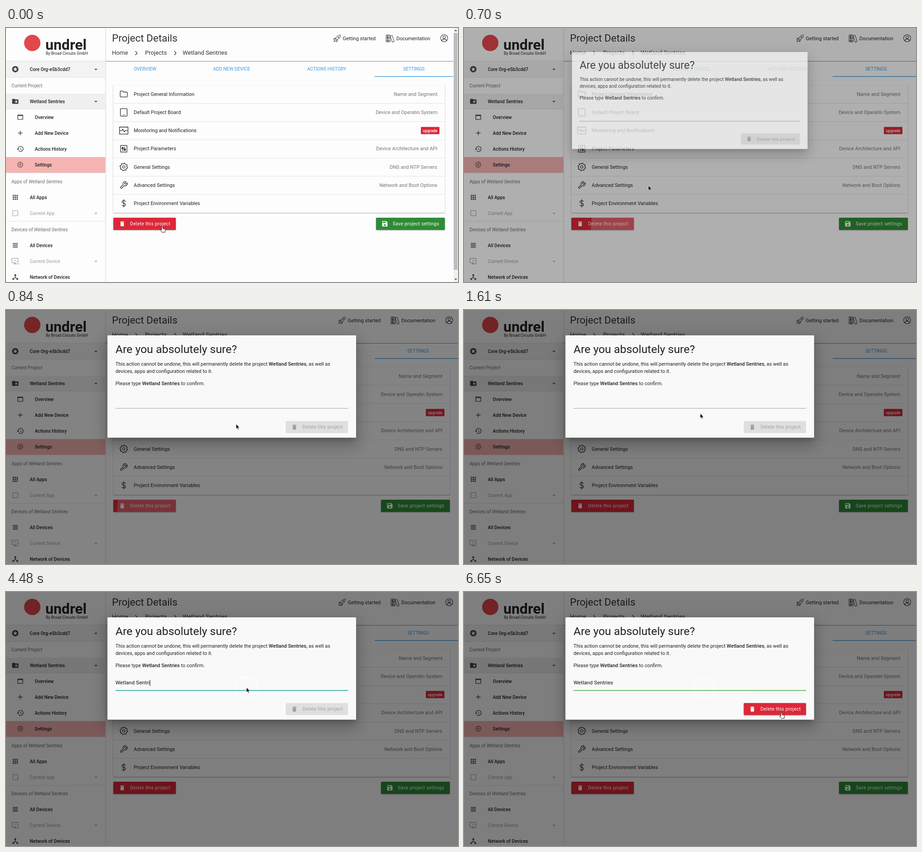
Write an HTML page that moves like this. It is 998 px wide and 561 px high and loops after 6.72 s.

```html
<!DOCTYPE html>
<html lang="en">
<head>
<meta charset="utf-8">
<title>Project settings</title>
<style>
html, body { margin: 0; width: 100%; height: 100%; overflow: hidden; background: #fdfdfd; }
body { --s: 0; position: relative; font-family: Roboto, Arial, sans-serif; }
svg, #shade, #dialog { position: absolute; left: 0; top: 0; }
svg { display: block; overflow: visible; }
text { font-size: 10.96px; fill: #212121; white-space: pre; }
.nav { font-size: 10.23px; font-weight: 500; }
.sub { font-size: 10.23px; fill: #6b6b6b; }
.sub tspan { font-style: italic; }
.crumb { font-size: 13.15px; fill: #333; }
.tab { font-size: 10.23px; fill: #3d9be0; text-anchor: middle; }
.note { fill: #757575; text-anchor: end; }
.btn { font-size: 10.23px; letter-spacing: .365px; fill: #fff; }
.b { font-weight: 500; }
.line { fill: none; stroke: #2b2b2b; stroke-linecap: round; stroke-linejoin: round; }
.r { transform: translateX(calc(var(--s) * 1px)); }
.wide { width: calc(732px + var(--s) * 1px); }
.raised { filter: drop-shadow(0 1px 1px rgba(0,0,0,.35)); }
#mark { width: calc(173px + var(--s) * 1px); }
#shade { width: 998px; height: 561px; background: #000; }
#dialog { left: 224.3px; top: 56px; width: 548.7px; height: 226px; border-radius: 1.5px; background: #f9f9f9;
  box-shadow: 0 17px 28px 2px rgba(0,0,0,.14), 0 7px 34px 6px rgba(0,0,0,.12), 0 8px 11px -5px rgba(0,0,0,.2); }
</style>
</head>
<body>
<svg id="page" width="998" height="561" viewBox="0 0 998 561"></svg>
<div id="shade"></div>
<div id="dialog"><svg id="form" width="548.7" height="226" viewBox="224.3 56 548.7 226"></svg></div>
<svg id="pointer" width="998" height="561" viewBox="0 0 998 561">
  <g id="arrow"><path d="M0 0V10.6L2.5 8.4 4.2 12.3 6 11.5 4.3 7.7H7.8Z" fill="#111" stroke="#fff" stroke-width=".7"/></g>
  <g id="hand"><path d="M-1.3 .8Q0 -.8 1.3 .8V5L6 6.2Q7 6.6 6.8 8L6 13.2H-.6L-4.2 8.6Q-4.4 7-2.8 7.2L-1.3 8.4Z" fill="#fff" stroke="#222" stroke-width="1"/></g>
  <g id="beam"><path d="M-2.5 -6H-.8L0 -5.3 .8 -6H2.5M0 -5.3V5.3M-2.5 6H-.8L0 5.3 .8 6H2.5" fill="none" stroke="#333" stroke-width="1"/></g>
</svg>

<script>
const LOOP = 6720, STEP = 70;
const PROJECT = 'Wetland Sentries';
const $ = id => document.getElementById(id);
const clamp = v => Math.max(0, Math.min(1, v));
const span = (t, a, b) => clamp((t - a) / (b - a));
const easeOut = p => 1 - (1 - p) ** 2;
const easeBoth = p => p * p * (3 - 2 * p);

// Icons on a 24-unit grid
const glyph = {
  star: 'M12 2C6.47 2 2 6.48 2 12s4.47 10 10 10 10-4.48 10-10S17.52 2 12 2zm4.23 16L12 15.45 7.77 18l1.12-4.81-3.73-3.23 4.92-.42L12 5l1.92 4.53 4.92.42-3.73 3.23z',
  project: 'M20 6h-8l-2-2H4c-1.1 0-2 .9-2 2v12c0 1.1.9 2 2 2h16c1.1 0 2-.9 2-2V8c0-1.1-.9-2-2-2zm-2.06 11L15 15.28 12.06 17l.78-3.33-2.59-2.24 3.41-.29L15 8l1.34 3.14 3.41.29-2.59 2.24z',
  window: 'M19 4H5c-1.1 0-2 .9-2 2v12c0 1.1.9 2 2 2h14c1.1 0 2-.9 2-2V6c0-1.1-.9-2-2-2zm0 14H5V8h14z',
  plus: 'M19 13h-6v6h-2v-6H5v-2h6V5h2v6h6z',
  history: 'M13 3c-4.97 0-9 4.03-9 9H1l3.9 4L9 12H6c0-3.87 3.13-7 7-7s7 3.13 7 7-3.13 7-7 7c-1.93 0-3.68-.79-4.94-2.06l-1.42 1.42C8.27 20 10.5 21 13 21c4.97 0 9-4.03 9-9s-4.03-9-9-9zm-1 5v5l4.28 2.54.72-1.21-3.5-2.08V8z',
  apps: [4, 10, 16].map(x => [4, 10, 16].map(y => `M${x} ${y}h4v4h-4z`).join('')).join(''),
  box: 'M19 5v14H5V5h14m0-2H5c-1.1 0-2 .9-2 2v14c0 1.1.9 2 2 2h14c1.1 0 2-.9 2-2V5c0-1.1-.9-2-2-2z',
  rows: [5, 9, 13, 17].map(y => `M4 ${y}h16v2H4z`).join(''),
  devices: 'M22 10h-4c-.6 0-1 .4-1 1v10c0 .6.4 1 1 1h4c.6 0 1-.4 1-1V11c0-.6-.4-1-1-1zm0 10h-4v-8h4zM20 2H2C1 2 0 3 0 4v12c0 1 1 2 2 2h7v2H7v2h8v-2h-2v-2h2v-2H2V4h18v4h2V4c0-1-1-2-2-2zM8 10l2-1 1-2 1 2 2 1-2 1-1 2-1-2z',
  hub: 'M17 16l-4-4V8.82C14.16 8.4 15 7.3 15 6c0-1.66-1.34-3-3-3S9 4.34 9 6c0 1.3.84 2.4 2 2.82V12l-4 4H3v5h5v-3.05l4-4.2 4 4.2V21h5v-5z',
  trash: 'M6 19c0 1.1.9 2 2 2h8c1.1 0 2-.9 2-2V7H6zM19 4h-3.5l-1-1h-5l-1 1H5v2h14z',
  save: 'M17 3H5c-1.1 0-2 .9-2 2v14c0 1.1.9 2 2 2h14c1.1 0 2-.9 2-2V7zm-5 16c-1.66 0-3-1.34-3-3s1.34-3 3-3 3 1.34 3 3-1.34 3-3 3zm3-10H5V5h10z',
  drop: 'M7 10l5 5 5-5z',
  folder: 'M22 18a2 2 0 0 1-2 2H4a2 2 0 0 1-2-2V5a2 2 0 0 1 2-2h5l2 3h9a2 2 0 0 1 2 2z',
  tablet: 'M4 1.5h16a1.5 1.5 0 0 1 1.5 1.5v18a1.5 1.5 0 0 1-1.5 1.5H4a1.5 1.5 0 0 1-1.5-1.5V3A1.5 1.5 0 0 1 4 1.5zM11 19h2',
  pulse: 'M0 2h24v20H0zM2 12h5l2.5-4 4 8 2.5-4h6',
  sliders: 'M3 2.5h18v19H3zM9 6v12M15 6v12M7 9h4v3H7zM13 13h4v3h-4z',
  wrench: 'M14.7 6.3a1 1 0 0 0 0 1.4l1.6 1.6a1 1 0 0 0 1.4 0l3.8-3.8a6 6 0 0 1-8 8l-6.9 6.9a2.1 2.1 0 0 1-3-3l6.9-6.9a6 6 0 0 1 8-8z',
  dollar: 'M12 1v22M17 6.5Q16 4.5 12 4.5C5.5 4.5 5.5 11 12 12S18.5 19.5 12 19.5Q8 19.5 7 17',
  rocket: 'M8 13C10 7 15 2 22 2c0 7-5 12-11 14zM9 11H4L2 15l5-1M13 15v5l-4 2 1-5M6 16l-4 6 5-3M14.5 9.5a1.8 1.8 0 1 1 3-2 1.8 1.8 0 1 1-3 2',
  books: 'M1 2h5v20H1zM6 2h6v20H6zM1 18h11M13 5l5-2 6 18-5 2zM9 6v7M3.5 6v7',
  user: 'M12 1.5a10.5 10.5 0 1 0 .01 0M12 5.5a3.8 3.8 0 1 0 .01 0M5 19Q7 14.5 12 14.5T19 19',
  gear: gear()
};

function gear() {
  const pts = [];
  for (let i = 0; i < 32; i++) {
    const a = (i + .5) * Math.PI / 16, r = i % 4 < 2 ? 10.9 : 8.8;
    pts.push((12 + r * Math.sin(a)).toFixed(2) + ' ' + (12 - r * Math.cos(a)).toFixed(2));
  }
  return `M${pts.join('L')}ZM12 8.5a3.5 3.5 0 1 0 .01 0z`;
}

const fillIcon = (name, x, y, color = '#424242', k = .7) =>
  `<path d="${glyph[name]}" fill="${color}" transform="translate(${x - 12 * k} ${y - 12 * k}) scale(${k})"/>`;
const lineIcon = (name, x, y, k = .78, w = 1.3) =>
  `<path class="line" d="${glyph[name]}" stroke-width="${w / k}" transform="translate(${x - 12 * k} ${y - 12 * k}) scale(${k})"/>`;
const text = (x, y, cls, str, extra = '') => `<text x="${x}" y="${y}" class="${cls}" ${extra}>${str}</text>`;
const rect = (x, y, w, h, fill, extra = '') => `<rect x="${x}" y="${y}" width="${w}" height="${h}" fill="${fill}" ${extra}/>`;

function sidebar() {
  const items = [
    [91, 0, 'star', 'Core Org-e5b3cdd7', 1], [162, 0, 'project', PROJECT, 1],
    [197, 1, 'window', 'Overview'], [232, 1, 'plus', 'Add New Device'],
    [267, 1, 'history', 'Actions History'], [302, 1, 'gear', 'Settings'],
    [374, 0, 'apps', 'All Apps'], [409, 0, 'box', 'Current App', 1, 1],
    [480, 0, 'rows', 'All Devices'], [515, 0, 'devices', 'Current Device', 1, 1],
    [550, 0, 'hub', 'Network of Devices']
  ];
  let out = rect(0, 0, 219.5, 561, '#fdfdfd', 'style="filter:drop-shadow(0 1px 1.3px rgba(0,0,0,.35))"')
    + '<circle cx="58" cy="33" r="18" fill="#e3474b"/>'
    + text(87, 48, '', 'undrel', 'style="font-size:32px;font-weight:700;fill:#222"')
    + text(88, 59, '', 'By Broad Circuits GmbH', 'style="font-size:8.7px"')
    + rect(0, 73, 219.5, 36, '#f3f3f3') + rect(0, 145, 219.5, 34, '#f0f0f0')
    + rect(0, 285, 219.5, 35, '#f5b4b2');
  for (const y of [73, 109, 179, 320, 427]) out += rect(0, y - .4, 219.5, .8, '#dcdcdc');
  out += text(12, 130.7, 'sub', 'Current Project')
    + text(12, 342.7, 'sub', `Apps of <tspan>${PROJECT}</tspan>`)
    + text(12, 448.7, 'sub', `Devices of <tspan>${PROJECT}</tspan>`);
  for (const [y, level, icon, label, drop, off] of items) {
    const x = level ? 31.5 : 20.5, color = off ? '#b0b0b0' : '#424242';
    out += icon === 'gear' ? lineIcon(icon, x, y, .56, 1) : fillIcon(icon, x, y, color);
    out += text(level ? 63.5 : 52.5, y + 3.7, 'nav', label, off ? 'style="fill:#b0b0b0"' : '');
    if (drop) out += fillIcon('drop', 198.5, y + .5, off ? '#b0b0b0' : '#555');
  }
  return out;
}

function main() {
  const rows = [
    ['folder', 'Project General Information', 'Name and Segment'],
    ['tablet', 'Default Project Board', 'Device and Operatin System'],
    ['pulse', 'Monitoring and Notifications', ''],
    ['sliders', 'Project Parameters', 'Device Architecture and API'],
    ['gear', 'General Settings', 'DNS and NTP Servers'],
    ['wrench', 'Advanced Settings', 'Network and Boot Options'],
    ['dollar', 'Project Environment Variables', '']
  ];
  const tabs = [[307, .23, 'OVERVIEW'], [498, .36, 'ADD NEW DEVICE'], [708, .63, 'ACTIONS HISTORY'], [900.5, .86, 'SETTINGS']];
  let out = rect(220, 73, 778, 1, '#858585')
    + text(234, 30, '', 'Project Details', 'style="font-size:22.4px;fill:#333"')
    + text(234, 59.3, 'crumb', 'Home') + text(307, 59.3, 'crumb', 'Projects') + text(390, 59.3, 'crumb', PROJECT)
    + '<path class="line" stroke-width="1.2" d="M286 51.5l3.5 4-3.5 4M372 51.5l3.5 4-3.5 4"/>'
    + '<g class="r">' + lineIcon('rocket', 731, 23, .75, 1) + text(743.5, 27, '', 'Getting started')
    + lineIcon('books', 848, 23, .76, 1) + text(862, 27, '', 'Documentation') + lineIcon('user', 967.5, 22.5, .74, 1.1) + '</g>';
  for (const [x, k, label] of tabs)
    out += text(x, 94, 'tab', label, `style="transform:translateX(calc(var(--s)*${k}px))"`);
  out += '<rect id="mark" x="814" y="106.5" height="1.4" fill="#3d9be0"/>'
    + '<rect class="wide raised" x="237" y="126.5" height="281.5" fill="#fdfdfd"/>';
  rows.forEach(([icon, label, note], i) => {
    const y = 146.2 + i * 40.17;
    if (i) out += `<rect class="wide" x="237" y="${y - 20.2}" height=".8" fill="#dcdcdc"/>`;
    out += lineIcon(icon, 260, y) + text(282, y + 3.7, '', label);
    if (note) out += `<g class="r">${text(952.5, y + 3.7, 'note', note)}</g>`;
  });
  out += '<g class="r">' + rect(916, 218.5, 41, 16, '#db2839', 'rx="1"')
    + text(936.5, 229.6, 'b', 'upgrade', 'style="font-size:8.77px;fill:#fff;text-anchor:middle"')
    + rect(817, 419, 152, 27, '#2f8b36', 'rx="1.5" class="raised"')
    + fillIcon('save', 836.5, 432.5, '#fff', .66) + text(854, 436.2, 'btn', 'Save project settings') + '</g>'
    + rect(237, 419, 138, 27, '#db2839', 'rx="1.5" class="raised"')
    + '<clipPath id="clip"><rect x="237" y="419" width="138" height="27" rx="1.5"/></clipPath>'
    + '<g clip-path="url(#clip)"><circle id="ripple" cx="345" cy="438" fill="#fff"/></g>'
    + fillIcon('trash', 256.5, 432.5, '#fff', .62) + text(274, 436.2, 'btn', 'Delete this project');
  const bar = rect(988, 0, 10, 561, '#f1f1f1') + rect(988.5, 11, 8.5, 523, '#bdbdbd')
    + '<path d="M990 7l3-3.5 3 3.5zM990 553.5l3 3.5 3-3.5z" fill="#555"/>';
  return out + `<g id="bar">${bar}</g>`;
}

function form() {
  const name = `<tspan class="b">${PROJECT}</tspan>`;
  return text(242, 95, '', 'Are you absolutely sure?', 'style="font-size:24.85px"')
    + text(242, 123.4, '', `This action cannot be undone, this will permanently delete the project ${name}, as well as`)
    + text(242, 139.4, '', 'devices, apps and configuration related to it.')
    + text(242, 166.5, '', `Please type ${name} to confirm.`)
    + '<circle id="ring" cx="531" cy="211" r="24" fill="none" stroke="#fff" stroke-width="3" opacity=".7"/>'
    + rect(242, 216.7, 513.8, 1, '#9e9e9e', 'id="rule"')
    + text(242, 204.5, '', '', 'id="typed" style="font-size:11.69px;fill:#111"')
    + rect(242, 194, 1, 13.5, '#111', 'id="caret"')
    + rect(618, 245.3, 137.5, 26.4, '#dfdfdf', 'id="go" rx="1.5"')
    + `<g id="goLabel">${fillIcon('trash', 637, 258.6, 'currentColor', .62)}`
    + text(655, 262.3, 'btn', 'Delete this project', 'style="fill:currentColor"') + '</g>';
}

$('page').innerHTML = main() + sidebar();
$('form').innerHTML = form();

const OPEN = 578, FOCUS = 1890, PRESS = 6090;
const keys = [2030, 2310, 2520, 2660, 2800, 2940, 3150, 3220, 3500, 3710, 3920, 4200, 4340, 4480, 4690, 4830];
const DONE = keys[keys.length - 1];
const path = [[0, 345, 438], [590, 345, 438], [700, 407, 348], [840, 508, 252], [910, 512, 246],
  [1470, 512, 246], [1750, 531, 211], [5180, 531, 211], [5720, 701, 266], [LOOP, 701, 266]];

function pointerAt(t) {
  const i = Math.max(1, path.findIndex(p => p[0] > t));
  const [ta, xa, ya] = path[i - 1], [tb, xb, yb] = path[i];
  const p = span(t, ta, tb), k = t > 1400 ? easeBoth(p) : p;
  return [xa + (xb - xa) * k, ya + (yb - ya) * k];
}

const mix = (a, b, p) => `rgb(${a.map((v, i) => Math.round(v + (b[i] - v) * p))})`;

function draw(t) {
  const opened = t >= OPEN, p = easeOut(span(t, OPEN, OPEN + 250));
  document.body.style.setProperty('--s', opened ? 11 : 0);
  $('bar').style.display = opened ? 'none' : '';
  $('shade').style.opacity = .5 * easeOut(span(t, OPEN, OPEN + 320));
  $('dialog').style.opacity = p;
  $('dialog').style.transform = `translateY(${33.7 * (p - 1)}px) scale(${.8 + .2 * p})`;

  $('ripple').setAttribute('r', Math.max(0, Math.min(130, (t - 440) * .25)));
  $('ripple').setAttribute('opacity', .26 * (1 - span(t, 900, 1400)));

  const count = keys.filter(k => k <= t).length;
  const typed = $('typed');
  typed.textContent = PROJECT.slice(0, count);
  const last = count ? keys[count - 1] : FOCUS;
  const blink = t >= FOCUS && t < PRESS && (t - last) % 1000 < 500;
  $('caret').style.display = blink ? '' : 'none';
  $('caret').setAttribute('x', 242.3 + (count ? typed.getComputedTextLength() : 0));

  const focus = span(t, FOCUS, FOCUS + 300), valid = span(t, DONE, DONE + 200);
  const teal = [38, 166, 154], green = [76, 175, 80];
  $('rule').setAttribute('fill', valid ? mix(teal, green, valid) : mix([158, 158, 158], teal, focus));
  $('rule').setAttribute('height', 1 + .6 * focus);
  $('ring').style.display = t >= FOCUS ? '' : 'none';
  $('go').setAttribute('fill', mix([223, 223, 223], [219, 40, 57], valid));
  $('go').setAttribute('class', valid ? 'raised' : '');
  $('goLabel').style.color = mix([159, 159, 159], [255, 255, 255], valid);

  const [x, y] = pointerAt(t);
  const shape = !opened || (t > 5000 && x > 618 && y > 245) ? 'hand' : t >= 1680 && t < 3710 ? 'beam' : 'arrow';
  for (const id of ['arrow', 'hand', 'beam']) $(id).style.display = id === shape ? '' : 'none';
  $(shape).setAttribute('transform', `translate(${x} ${y})`);
}

function tick() {
  const t = performance.now() % LOOP;
  draw(Math.floor(t / STEP) * STEP);
  requestAnimationFrame(tick);
}
tick();
</script>
</body>
</html>
```
